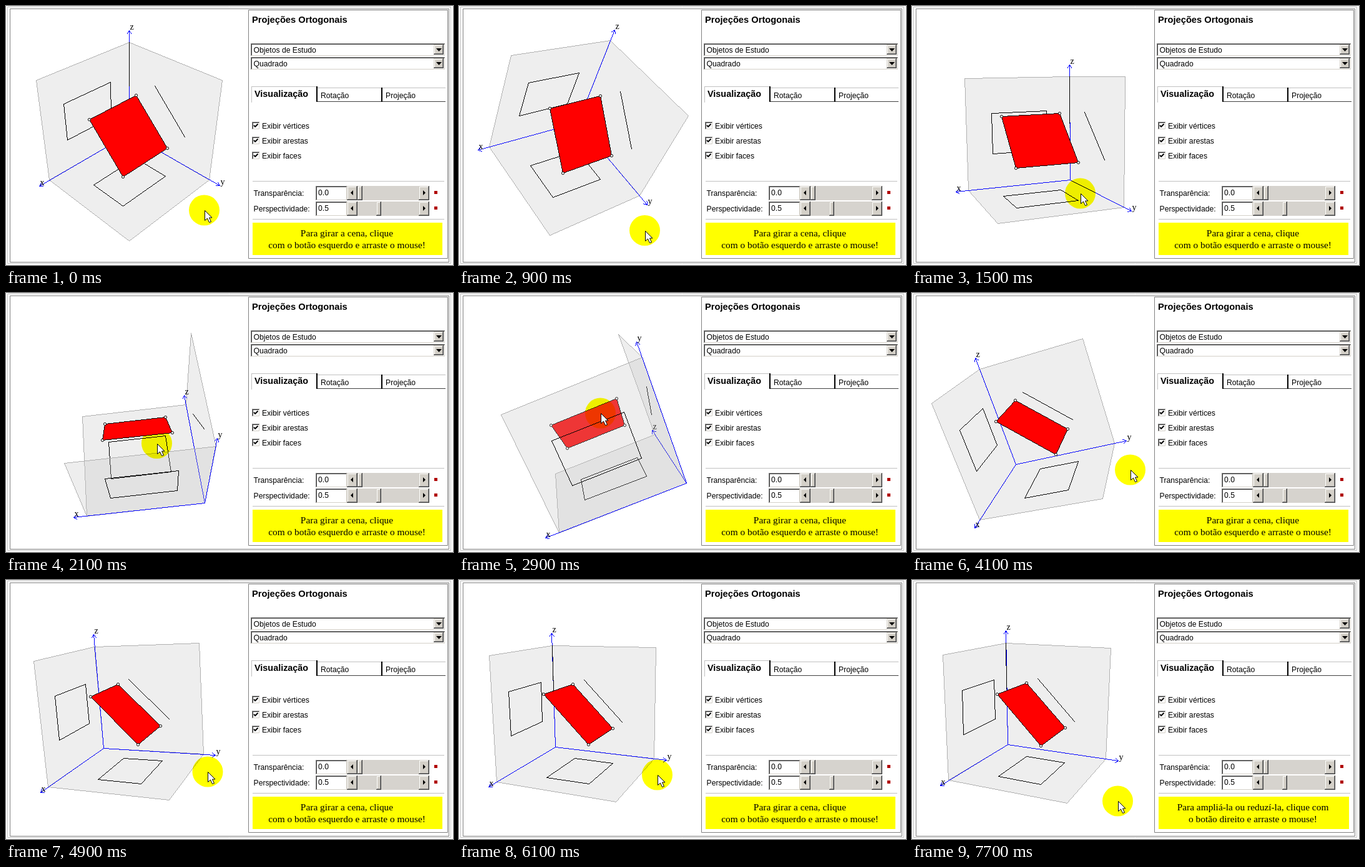
Animation, 716 px wide and 416 px high, one loop 8 s. Source, as an HTML page with a canvas:

```html
<!DOCTYPE html>
<html lang="pt">
<head>
<meta charset="utf-8">
<title>Projeções Ortogonais</title>
<style>
html, body { margin: 0; width: 100%; height: 100%; overflow: hidden; background: #fff; }
canvas { display: block; }
</style>
</head>
<body>
<canvas id="stage" width="716" height="416"></canvas>
<script>
const ctx = document.getElementById('stage').getContext('2d');
const LOOP = 8000;
const SANS = '"Liberation Sans", Arial, sans-serif';
const SERIF = '"Liberation Serif", "Times New Roman", serif';

// Camera; PIVOT offsets the scene from its centre of rotation
const CX = 197.7, CY = 205.6, DIST = 6.6, FOCAL = 730.4, PIVOT = 0.01;

// Square under study: two x values, two (y, z) ends
const SQUARE = [[0.38, -0.42, 0.235], [-0.57, -0.42, 0.235], [-0.57, 0.25, -0.43], [0.38, 0.25, -0.43]];

// Orientation (w, x, y, z) and pointer position at given steps
const POSES = [
  { at: 0, q: [0.340, -0.176, -0.425, -0.820] },
  { at: 3, q: [0.226, -0.251, -0.333, -0.881] },
  { at: 9, q: [0.024, 0.051, -0.872, -0.485] },
  { at: 13, q: [0.009, 0.191, -0.967, -0.171] },
  { at: 19, q: [0.560, -0.258, -0.548, -0.568] },
  { at: 25, q: [0.427, -0.335, -0.530, -0.650], settle: 1.6 },
  { at: 26, q: [0.425, -0.335, -0.518, -0.660] }
];
const POINTER = [
  { at: 0, p: [317.5, 328] },
  { at: 3, p: [297.5, 360.5] },
  { at: 9, p: [241.5, 241.5] },
  { at: 13, p: [226.5, 193] },
  { at: 19, p: [349.5, 284] },
  { at: 25, p: [317.5, 313], settle: 1.6 },
  { at: 26, p: [317.5, 313] },
  { at: 32, p: [329.5, 355] }
];

const HINTS = [
  { width: 304, lines: ['Para girar a cena, clique', 'com o botão esquerdo e arraste o mouse!'] },
  { width: 305, lines: ['Para ampliá-la ou reduzí-la, clique com', 'o botão direito e arraste o mouse!'] }
];

function stepAt(t) {
  if (t < 500) return 0;
  if (t < 5300) return 1 + Math.floor((t - 500) / 200);
  if (t < 6100) return 24;
  if (t < 6300) return 25;
  if (t < 6700) return 26;
  return Math.min(32, 27 + Math.floor((t - 6700) / 200));
}

function between(keys, n) {
  const i = keys.findIndex(k => k.at >= n);
  if (i < 0) return [keys.at(-1), keys.at(-1), 0];
  if (i === 0) return [keys[0], keys[0], 0];
  const a = keys[i - 1], b = keys[i];
  const u = (n - a.at) / (b.at - a.at);
  return [a, b, 1 - Math.pow(1 - u, b.settle || 1)];
}

function slerp(a, b, u) {
  const dot = a.reduce((s, v, i) => s + v * b[i], 0);
  const angle = Math.acos(Math.min(1, dot));
  const k = Math.sin(angle);
  const wa = k < 1e-3 ? 1 - u : Math.sin((1 - u) * angle) / k;
  const wb = k < 1e-3 ? u : Math.sin(u * angle) / k;
  const q = a.map((v, i) => v * wa + b[i] * wb);
  const len = Math.hypot(...q);
  return q.map(v => v / len);
}

function matrix([w, x, y, z]) {
  return [
    [1 - 2 * (y * y + z * z), 2 * (x * y - w * z), 2 * (x * z + w * y)],
    [2 * (x * y + w * z), 1 - 2 * (x * x + z * z), 2 * (y * z - w * x)],
    [2 * (x * z - w * y), 2 * (y * z + w * x), 1 - 2 * (x * x + y * y)]
  ];
}

function project(m, p) {
  const [px, py, pz] = p.map(v => v + PIVOT);
  const [x, y, z] = m.map(r => r[0] * px + r[1] * py + r[2] * pz);
  const s = FOCAL / (DIST - z);
  return [Math.floor(CX + x * s) + 0.5, Math.floor(CY - y * s) + 0.5];
}

function rect(x, y, w, h, color) {
  ctx.fillStyle = color;
  ctx.fillRect(x, y, w, h);
}

function frame(x, y, w, h, color) {
  ctx.strokeStyle = color;
  ctx.strokeRect(x + 0.5, y + 0.5, w - 1, h - 1);
}

function path(points, closed) {
  ctx.beginPath();
  points.forEach(p => ctx.lineTo(p[0], p[1]));
  if (closed) ctx.closePath();
}

function fill(points, color) {
  path(points, true);
  ctx.fillStyle = color;
  ctx.fill();
}

// Hard-edged line, one pixel wide
function line([x0, y0], [x1, y1], color) {
  const n = Math.max(1, Math.round(Math.max(Math.abs(x1 - x0), Math.abs(y1 - y0))));
  for (let i = 0; i <= n; i++) {
    rect(Math.floor(x0 + (x1 - x0) * i / n), Math.floor(y0 + (y1 - y0) * i / n), 1, 1, color);
  }
}

function outline(points, color) {
  points.forEach((p, i) => line(p, points[(i + 1) % points.length], color));
}

function text(str, x, y, font, align = 'left') {
  ctx.font = font;
  ctx.textAlign = align;
  ctx.fillStyle = '#000';
  ctx.fillText(str, x, y);
}

function drawFace(m, axis) {
  const a = (axis + 1) % 3, b = (axis + 2) % 3;
  const corner = (u, v) => {
    const p = [-1, -1, -1];
    p[a] = u;
    p[b] = v;
    return project(m, p);
  };
  const corners = [corner(-1, -1), corner(0.8, -1), corner(0.8, 0.8), corner(-1, 0.8)];
  fill(corners, 'rgba(192,192,192,.28)');
  outline(corners, '#b0b0b0');
  outline(SQUARE.map(p => project(m, p.map((v, i) => i === axis ? -1 : v))), '#000');
}

function drawAxis(m, axis) {
  const on = v => project(m, [0, 1, 2].map(i => i === axis ? v : -1));
  const from = on(-1), tip = on(1);
  line(from, tip, '#00f');
  const dir = Math.atan2(tip[1] - from[1], tip[0] - from[0]);
  for (const turn of [0.6, -0.6]) {
    line(tip, [tip[0] - 6 * Math.cos(dir + turn), tip[1] - 6 * Math.sin(dir + turn)], '#00f');
  }
  if (axis === 2 && Math.abs(m[0][2]) < 0.03) line(on(0), on(0.8), '#000');
  text('xyz'[axis], tip[0] + 1, tip[1] - 2, '14px ' + SERIF);
}

function drawSquare(m) {
  const pts = SQUARE.map(p => project(m, p));
  fill(pts, '#f00');
  outline(pts, '#000');
  ctx.strokeStyle = '#000';
  for (const [x, y] of pts) {
    ctx.beginPath();
    ctx.arc(x, y, 2.1, 0, 7);
    ctx.fillStyle = '#fff';
    ctx.fill();
    ctx.stroke();
  }
}

function drawScene(n) {
  const [a, b, u] = between(POSES, n);
  const m = matrix(slerp(a.q, b.q, u));
  const axes = [0, 1, 2];
  const inFront = i => DIST * m[2][i] < -1;
  const onTop = i => axes.some(j => j !== i && inFront(j));
  axes.filter(i => !inFront(i)).forEach(i => drawFace(m, i));
  axes.filter(i => !onTop(i)).forEach(i => drawAxis(m, i));
  drawSquare(m);
  axes.filter(inFront).forEach(i => drawFace(m, i));
  axes.filter(onTop).forEach(i => drawAxis(m, i));
}

function drawPointer(n) {
  const [a, b, u] = between(POINTER, n);
  const [x, y] = a.p.map((v, i) => v + (b.p[i] - v) * u);
  ctx.globalCompositeOperation = 'multiply';
  ctx.beginPath();
  ctx.arc(x, y, 24.5, 0, 7);
  ctx.fillStyle = '#ff0';
  ctx.fill();
  ctx.globalCompositeOperation = 'source-over';
  const ox = Math.round(x) + 0.5, oy = Math.round(y) + 0.5;
  const arrow = [[0, 0], [0, 16], [4, 12.5], [7, 19], [10, 18], [7, 11.5], [11.5, 11.5]];
  fill(arrow.map(p => [p[0] + ox, p[1] + oy]), '#fff');
  ctx.strokeStyle = '#000';
  ctx.stroke();
}

function sunken(x, y, w, h) {
  rect(x, y, w, h, '#fff');
  frame(x, y, w, h, '#d4d0c8');
  rect(x, y, w, 1, '#808080');
  rect(x, y, 1, h, '#808080');
  rect(x + 1, y + 1, w - 2, 1, '#404040');
  rect(x + 1, y + 1, 1, h - 2, '#404040');
}

function raised(x, y, w, h) {
  rect(x, y, w, h, '#d4d0c8');
  rect(x, y + h - 1, w, 1, '#404040');
  rect(x + w - 1, y, 1, h, '#404040');
  rect(x + 1, y + 1, w - 3, 1, '#fff');
  rect(x + 1, y + 1, 1, h - 3, '#fff');
  rect(x + 1, y + h - 2, w - 2, 1, '#808080');
  rect(x + w - 2, y + 1, 1, h - 2, '#808080');
}

const label = (str, x, y) => text(str, x, y, '12.2px ' + SANS);

function select(str, y) {
  sunken(392, y, 311, 20);
  raised(685, y + 2, 16, 16);
  fill([[689, y + 8], [698, y + 8], [693.5, y + 13]], '#000');
  label(str, 396.5, y + 15);
}

function checkbox(str, y) {
  sunken(394, y, 12, 12);
  path([[397, y + 5.5], [399, y + 8], [403.5, y + 3.5]]);
  ctx.strokeStyle = '#000';
  ctx.lineWidth = 2;
  ctx.stroke();
  ctx.lineWidth = 1;
  label(str, 410, y + 11);
}

function slider(str, value, y, thumb) {
  label(str, 396.5, y + 16);
  sunken(496, y, 50, 23);
  label(value, 500, y + 15);
  rect(546, y, 132, 23, '#d6d3ce');
  raised(546, y, 17, 23);
  raised(661, y, 17, 23);
  raised(thumb, y, 8, 23);
  fill([[556, y + 7], [556, y + 15], [552, y + 11]], '#000');
  fill([[668, y + 7], [668, y + 15], [672, y + 11]], '#000');
  rect(686, y + 8, 5, 5, '#b00000');
}

function drawHint({ width, lines }) {
  rect(395, 348, width, 52, '#ff0');
  lines.forEach((s, i) => text(s, 546, 370 + 19 * i, '15.4px ' + SERIF, 'center'));
}

function drawPanel(n) {
  rect(388, 6, 320, 400, '#fff');
  frame(388, 6, 320, 400, '#808080');
  text('Projeções Ortogonais', 394, 27, 'bold 14.7px ' + SANS);
  select('Objetos de Estudo', 60);
  select('Quadrado', 82);

  rect(393, 129, 104, 1, '#c0c0c0');
  rect(393, 129, 1, 26, '#c0c0c0');
  rect(497, 129, 2, 25, '#000');
  text('Visualização', 398, 146, 'bold 14.4px ' + SANS);
  rect(499, 131, 102, 1, '#c0c0c0');
  rect(499, 153, 102, 1, '#404040');
  rect(601, 131, 2, 23, '#000');
  label('Rotação', 504, 148);
  rect(603, 131, 101, 1, '#c0c0c0');
  rect(603, 153, 101, 1, '#404040');
  label('Projeção', 608, 148);

  checkbox('Exibir vértices', 186);
  checkbox('Exibir arestas', 210);
  checkbox('Exibir faces', 234);

  rect(395, 281, 307, 1, '#c0c0c0');
  slider('Transparência:', '0.0', 289, 563);
  slider('Perspectividade:', '0.5', 314, 593);
  rect(395, 342, 307, 1, '#c0c0c0');
  drawHint(HINTS[n > 26 ? 1 : 0]);
}

function draw(now) {
  const n = stepAt(now % LOOP);
  ctx.lineWidth = 1;
  ctx.lineJoin = 'round';
  rect(0, 0, 716, 416, '#fff');
  frame(2, 1, 711, 413, '#c0c0c0');
  frame(6, 4, 704, 408, '#808080');
  drawScene(n);
  drawPanel(n);
  drawPointer(n);
}

const start = performance.now();
function tick() {
  draw(performance.now() - start);
  requestAnimationFrame(tick);
}
tick();
</script>
</body>
</html>
```
